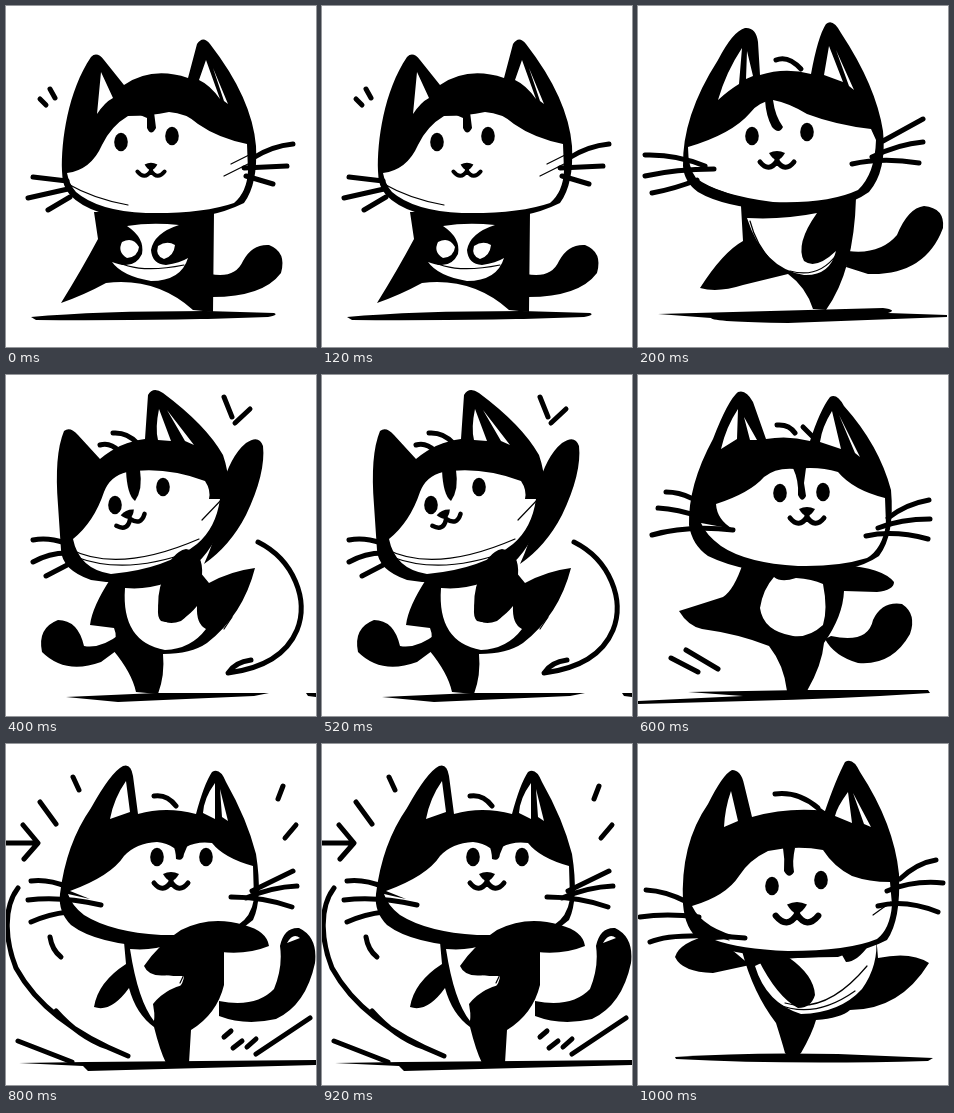
An HTML page with a canvas that plays this animation: 310 by 341 pixels, repeating every 1200 ms.

```html
<!DOCTYPE html>
<html lang="en">
<head>
<meta charset="utf-8">
<title>Dancing cat</title>
<style>
  html, body { margin: 0; width: 100%; height: 100%; overflow: hidden; background: #fff }
  canvas { display: block; width: 100%; height: 100% }
</style>
</head>
<body>
<canvas id="stage"></canvas>
<script>
const W = 310, H = 341, HOLD = 200;
const canvas = document.getElementById("stage");
const c = canvas.getContext("2d");

function fill(color, d) {
  c.fillStyle = color;
  c.fill(new Path2D(d));
}
const ink = d => fill("#000", d);
const paper = d => fill("#fff", d);

function line(d, width = 5) {
  c.lineWidth = width;
  c.stroke(new Path2D(d));
}
const scratch = d => line(d, 1.2);

function eyes(x1, y1, x2, y2) {
  for (const [x, y] of [[x1, y1], [x2, y2]]) {
    c.beginPath();
    c.ellipse(x, y, 6.8, 9.2, 0, 0, 7);
    c.fill();
  }
}

// Nose at (x, y) with the smile below it.
function muzzle(x, y, size = 1, turn = 0) {
  c.save();
  c.translate(x, y);
  c.rotate(turn);
  c.scale(size, size);
  ink("M-8-2Q0-6 8-2Q4 5 0 5Q-4 5-8-2Z");
  line("M-17 7Q-8 18 0 6Q8 18 17 7M0 2V6");
  c.restore();
}

function stand() {
  ink("M25 311Q90 305 200 305L268 307Q273 309 262 311Q150 315 30 314Z");
  ink("M88 206L92 233Q76 263 55 297Q78 289 100 277Q150 271 187 304L207 306L208 206Z");
  ink("M204 268Q229 273 237 255Q246 238 263 239Q281 246 275 267Q257 291 206 291Z");
  paper("M121 220Q145 216 173 219Q148 227 145 244Q146 258 160 259Q174 257 182 252Q175 275 145 275Q116 270 106 256Q128 265 136 248Q139 232 121 220Z");
  paper("M116 236Q127 230 133 241Q132 251 121 252Q111 246 116 236ZM152 240Q161 234 169 239Q168 250 158 253Q149 250 152 240Z");
  ink("M56 165C55 135 62 85 85 51Q91 45 98 54L118 79Q146 60 182 72L191 38Q197 29 204 38Q246 92 250 140Q252 178 238 197Q200 216 140 214Q85 211 64 189Q56 180 56 165Z");
  paper("M61 167Q85 164 96 139Q105 120 122 110Q145 110 163 106Q180 107 192 118Q212 132 241 138L242 165Q241 186 228 197Q196 208 140 207Q92 205 70 186Q63 178 61 167Z");
  paper("M95 66L91 108Q99 96 107 92ZM200 54L193 74Q204 79 214 93ZM207 62L222 98L218 95Z");
  line("M27 171L61 175M22 192L62 183M42 204L64 191");
  line("M247 152Q266 140 287 138M238 162L281 160M240 170L267 178");
  line("M34 93L40 99M44 83L49 92");
  ink("M134 109L148 106L150 122Q145 131 141 122V112Z");
  scratch("M62 178Q88 193 122 199M225 158L243 149M218 170L242 158M105 252Q128 269 178 259");
  eyes(115, 136, 166, 130);
  muzzle(145, 160, 0.8);
}

function stride() {
  ink("M20 308L245 302Q260 304 250 307L309 309V311L150 317Q75 316 73 312Z");
  ink("M103 200L105 235Q85 246 62 282Q80 287 105 279L150 268Q168 281 175 303L188 304Q216 265 218 192Z");
  ink("M210 245Q242 249 259 229Q270 202 286 200Q307 202 305 222Q287 270 230 268L208 261Z");
  paper("M109 212Q145 214 179 207Q157 238 166 255Q178 264 198 245Q192 270 166 269Q125 262 109 212Z");
  ink("M45 160Q44 110 80 54Q95 25 107 22Q118 21 120 36L122 69Q147 61 173 68Q180 30 188 18Q195 12 203 27Q238 80 245 125Q249 165 231 186Q200 208 140 205Q85 201 60 186Q46 176 45 160Z");
  paper("M50 141Q94 128 112 107Q120 96 135 94Q151 97 169 108Q198 119 233 123L238 134Q237 168 220 184Q190 198 135 196Q80 189 58 172Q50 162 50 141Z");
  paper("M104 42Q88 66 80 94Q91 84 101 78ZM109 45L115 70L108 73ZM191 40L186 69L205 76ZM198 44L216 84L211 80Z");
  line("M7 149Q38 148 67 160M7 170Q38 163 76 163M14 187Q36 183 59 174");
  line("M245 135L285 113M234 151Q261 138 285 136M214 158Q244 151 281 157");
  line("M138 54Q150 49 163 63");
  ink("M127 94L135 94Q137 110 145 121Q141 129 134 121Q128 110 127 94Z");
  scratch("M58 175Q95 193 130 197M112 215Q118 239 135 257M152 265Q181 273 199 248");
  eyes(114, 130, 169, 126);
  muzzle(139, 149);
}

function wave() {
  ink("M60 322L150 318L263 318L248 321L112 327ZM300 318H310V322L302 321Z");
  ink("M105 203Q86 232 84 250L108 253Q112 262 107 275Q126 298 130 317L152 319Q159 300 157 279Q185 279 201 268Q237 240 249 193Q225 196 203 208L180 180Z");
  ink("M114 259Q95 274 78 271Q72 245 52 245Q31 253 36 277Q59 300 95 287L114 273Z");
  ink("M215 115Q224 81 240 68Q253 59 257 71Q260 98 240 140Q224 171 198 189Q216 150 215 115Z");
  paper("M119 213Q140 215 160 208Q147 238 155 246Q174 252 191 231Q190 249 200 254Q185 274 159 275Q115 267 119 213Z");
  ink("M52 130Q48 80 58 56Q64 51 72 60L94 84Q114 67 139 64L142 20Q147 11 157 18Q200 50 217 80Q228 112 218 145Q205 181 177 200Q130 213 85 205Q56 195 55 175Z");
  paper("M67 164Q88 147 98 117Q104 101 121 97Q159 91 199 106Q205 115 203 124L214 124Q210 153 191 169Q160 194 105 199Q73 194 67 164Z");
  paper("M153 34Q149 53 152 65L165 66ZM161 35L188 70L179 66Z");
  line("M27 165Q42 162 59 168M27 187Q43 178 61 178M40 201L65 188");
  line("M94 70Q104 67 113 76M107 58Q121 57 131 68M218 22L226 42M229 48L244 34");
  line("M252 167C288 185 303 225 291 255Q276 291 222 298Q229 287 245 285");
  ink("M120 95L134 95Q137 115 129 126Q121 120 120 95Z");
  ink("M157 203Q165 177 180 174Q198 177 196 201Q191 235 175 246Q159 252 153 240Q150 221 157 203Z");
  scratch("M64 174Q112 199 193 164M70 182Q120 201 186 176M196 145L219 121M218 254L226 242");
  eyes(109, 130, 157, 112);
  muzzle(122, 139, 0.9, -0.4);
}

function kick() {
  ink("M50 317L165 315L290 315L292 318Q200 324 110 326L0 329V326L105 321Z");
  ink("M105 188Q96 215 85 222Q57 231 41 236Q50 251 64 254Q101 259 131 271Q146 290 149 316L169 316Q184 290 186 268Q205 241 206 216L239 217Q256 215 256 207Q245 193 205 190Z");
  ink("M193 261Q230 269 235 245Q244 226 264 229Q279 239 272 259Q254 291 220 288Q196 281 187 264Z");
  paper("M136 202Q143 208 158 203Q174 204 185 209Q190 234 185 250Q171 263 155 261Q125 256 122 233Q125 214 136 202Z");
  ink("M51 150Q50 110 75 64Q90 25 100 17Q108 14 115 27L128 64Q150 60 172 66Q182 35 192 22Q199 18 206 31Q241 70 253 115Q257 160 241 181Q215 199 160 199Q105 198 70 181Q54 170 51 150Z");
  paper("M78 129Q112 118 126 102Q138 92 158 94Q180 91 200 97Q215 115 247 123L248 150Q244 174 229 183Q200 192 160 191Q108 188 83 171Q68 160 63 148L95 154Q79 145 78 129Z");
  paper("M100 34Q88 52 83 74L99 64ZM106 42L119 65L112 65ZM194 36Q184 52 182 67L203 74ZM201 40L222 82L217 78Z");
  line("M28 117Q41 117 53 123M20 133Q40 134 62 142M14 160Q50 150 95 155");
  line("M250 143Q268 129 291 125M240 153Q263 144 292 144M228 161Q256 155 290 164");
  line("M139 50Q151 49 157 58M165 52L174 61M33 283L60 297M48 275L80 294");
  ink("M155 93L168 93L166 108L168 121Q164 129 160 120Q161 106 155 93Z");
  scratch("M63 163Q91 187 145 194M71 172Q83 185 104 190M193 239Q200 226 201 213M251 276Q265 269 267 253");
  eyes(142, 118, 185, 117);
  muzzle(169, 136);
}

function spin() {
  ink("M13 319L80 318L310 316V321L82 327L77 322Z");
  ink("M118 198L120 220Q92 238 88 263Q105 269 123 244Q130 270 148 283Q154 307 160 319L183 319L185 286Q211 270 218 241L218 190Z");
  ink("M213 257Q250 264 268 245Q277 223 274 202Q278 183 293 184Q312 193 309 219Q300 261 270 275Q239 282 213 272Z");
  paper("M124 205Q147 207 165 200L142 220Q147 233 178 232Q177 246 157 254Q148 263 148 277Q132 257 124 205ZM281 199Q287 188 294 194Z");
  ink("M54 150Q60 100 85 64Q105 28 117 22Q125 19 127 32L132 70Q160 62 190 70Q198 40 206 28Q214 23 220 38Q241 75 250 110Q257 155 247 176Q220 201 150 203Q90 200 65 181Q52 168 54 150Z");
  paper("M64 147Q105 132 118 112Q130 99 151 98Q161 99 168 104L180 103Q191 97 206 99Q218 114 247 122L248 155Q245 173 232 181Q205 192 155 191Q105 188 78 171Q66 162 62 150L84 155Z");
  paper("M120 37Q108 54 104 75L124 68ZM209 39Q198 54 197 69L209 75ZM214 45L222 77L216 73Z");
  line("M25 137Q43 135 61 143M22 156Q55 152 95 161M25 178Q43 170 62 168");
  line("M246 147L287 127M240 154Q266 143 291 142M225 153Q258 153 286 163");
  line("M148 52Q161 50 170 62M67 33L73 46M34 58L50 80M0 99L31 99M17 81L32 99L18 115");
  line("M272 55L277 42M279 94L290 81M44 193Q46 206 55 213");
  line("M12 144C-4 165 0 199 10 224Q40 279 122 312M50 267Q73 293 101 303M12 297L66 318");
  line("M250 310L304 274M218 293L225 287M227 304L236 297M241 303L250 295");
  ink("M166 98L183 98L178 110Q177 118 170 115Q170 107 166 98Z");
  ink("M138 222Q153 200 175 186Q205 171 238 181Q261 187 263 202Q241 211 215 208Q190 224 163 231Q143 234 138 222Z");
  ink("M147 260Q161 242 190 238L216 240Q211 267 184 286L150 281Z");
  scratch("M63 170Q93 194 145 196M73 180Q102 199 137 199M174 239L182 222M180 241L188 223M186 241L195 221");
  eyes(151, 113, 200, 113);
  muzzle(165, 132);
}

function twirl() {
  ink("M37 313Q110 308 200 310L295 314L290 317Q150 321 38 315Z");
  ink("M104 207Q115 249 138 279Q144 298 147 309L155 316L163 309Q174 290 178 276Q203 274 212 266Q262 266 291 219Q273 207 240 214L238 190Z");
  ink("M75 190Q41 198 37 213Q44 228 75 229L112 221Z");
  paper("M117 222Q130 213 200 213Q225 205 238 193Q241 221 224 245Q202 269 163 270Q128 259 117 222Z");
  ink("M45 160Q42 100 70 60Q85 30 94 26Q103 26 106 40L114 73Q150 63 187 67Q198 35 207 18Q215 13 222 28Q256 80 261 130Q263 176 249 196Q215 214 150 214Q90 211 62 196Q47 186 45 160Z");
  paper("M54 162Q88 152 101 132Q111 116 130 107Q159 101 185 106Q196 123 214 132Q231 138 252 138L254 161Q252 185 239 195Q210 207 150 207Q101 205 77 196L105 194Q65 185 54 162Z");
  paper("M93 47Q87 64 86 83L100 77ZM210 48Q199 63 197 72L214 79ZM215 49L233 83L226 80Z");
  line("M8 146Q28 147 49 158M2 173Q28 169 61 173M12 198Q35 188 107 194");
  line("M262 135Q279 119 298 116M249 147Q276 136 305 139M240 162Q267 155 300 168");
  line("M137 50Q160 47 180 64M181 66L188 71");
  ink("M145 104L157 104Q154 117 156 128Q151 136 146 127Q147 115 145 104Z");
  ink("M120 215Q126 207 150 213Q176 231 177 251Q173 264 160 264Q139 253 120 215ZM204 211L231 201Q219 218 208 218Z");
  scratch("M58 172Q67 189 91 196M139 260Q176 276 217 247M147 259Q188 271 229 222M235 171L253 158");
  eyes(134, 142, 183, 136);
  muzzle(159, 163, 1.25);
}

const dance = [stand, stride, wave, kick, spin, twirl];
const start = performance.now();

function tick() {
  const ratio = devicePixelRatio || 1;
  canvas.width = innerWidth * ratio;
  canvas.height = innerHeight * ratio;
  c.scale(canvas.width / W, canvas.height / H);
  c.lineCap = c.lineJoin = "round";
  paper(`M0 0H${W}V${H}H0Z`);
  const elapsed = performance.now() - start;
  dance[Math.floor(elapsed / HOLD) % dance.length]();
  requestAnimationFrame(tick);
}
tick();
</script>
</body>
</html>
```
